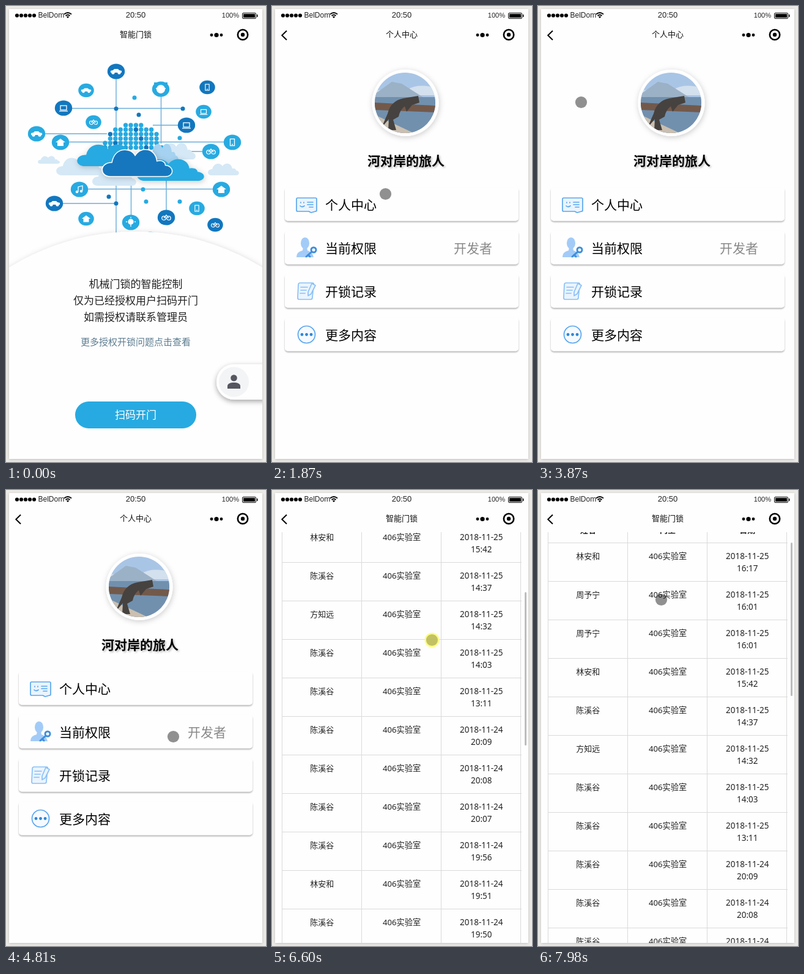
These frames come from a looping animation (425 px wide and 746 px high, 8000 ms). An HTML page:

```html
<!DOCTYPE html>
<html lang="zh-CN">
<head>
<meta charset="utf-8">
<title>智能门锁</title>
<style>
html, body { margin: 0; width: 100%; height: 100%; overflow: hidden; background: #ecebe7; }
svg { display: block; width: 425px; height: 746px; }
text { font-family: "Noto Sans", "Noto Sans CJK SC", "Noto Sans CJK", sans-serif; }
.status text { font-family: "Liberation Sans", sans-serif; fill: #222; }
.glyph { fill: none; stroke: #fff; stroke-width: 1.3; }
.glyph .solid { fill: #fff; stroke: none; }
.icon { fill: #eaf4fe; stroke: #5aa6ec; stroke-width: 1.7; stroke-linecap: round; stroke-linejoin: round; }
.icon .line { fill: none; }
</style>
</head>
<body>
<script>
const LOOP = 8000, WIDTH = 414;
const SKY = '#27aae1', DEEP = '#1277bf', PALE = '#d5e8f6', PAPER = '#fefefe';

// ---------- drawing helpers ----------
const repeat = (count, draw) => Array.from({ length: count }, (_, i) => draw(i)).join('');
const text = (str, x, cy, size, { fill = '#222', anchor = 'middle', extra = '' } = {}) =>
  `<text x="${x}" y="${cy + size * 0.37}" font-size="${size}" fill="${fill}" text-anchor="${anchor}" ${extra}>${str}</text>`;
const label = (str, x, cy, fill = '#000') => text(str, x, cy, 21, { fill, anchor: 'start' });
const circle = (x, y, r, fill, extra = '') => `<circle cx="${x}" cy="${y}" r="${r}" fill="${fill}" ${extra}/>`;
const rect = (x, y, w, h, fill, extra = '') =>
  `<rect x="${x}" y="${y}" width="${w}" height="${h}" fill="${fill}" ${extra}/>`;
const path = (d, attrs = '') => `<path d="${d}" ${attrs}/>`;
const pill = (x, y, w, h, str, size) =>
  rect(x, y, w, h, SKY, `rx="${h / 2}"`) + text(str, x + w / 2, y + h / 2, size, { fill: '#fff' });
const card = cy => rect(21, cy - 29, 382, 55, PAPER, 'rx="5" filter="url(#cardShadow)"');
const page = (id, content) => `<g id="${id}">${rect(5, 69, WIDTH, 672, PAPER)}${content}</g>`;

// ---------- home ----------
const CLOUD = 'M12 40C-4 40-4 20 14 20C18-2 40-2 47 10C56-4 76 0 78 18C86 16 90 20 90 24C103 25 103 40 90 40Z';
const cloud = (x, y, w, h, fill, edge = 'none') =>
  path(CLOUD, `transform="translate(${x} ${y}) scale(${w / 100} ${h / 40})" fill="${fill}" stroke="${edge}" stroke-width="1.5" vector-effect="non-scaling-stroke"`);

const glyphs = {
  vehicle: path('M-9 2V-1L-5-2L-3-4H3L5-2L9-1V2Z', 'class="solid"') + circle(-5, 2, 2, '#fff') + circle(5, 2, 2, '#fff'),
  screen: rect(-5, -4, 10, 7, 'none') + path('M-7 5H7'),
  handset: rect(-3.5, -5.5, 7, 11, 'none') + path('M-1 3.500H1'),
  pair: circle(-4, 1, 3.2, 'none') + circle(4, 1, 3.2, 'none') + path('M-4 1L0-4L4 1'),
  note: path('M-2 4V-4L5-6V2') + circle(-4, 4, 1.6, '#fff') + circle(3, 3, 1.6, '#fff'),
  house: path('M-8 0L0-6L8 0H5V6H-5V0Z', 'class="solid"'),
  bulb: circle(0, -1, 4, '#fff') + path('M0 3V7M-8-1H-6M6-1H8M0-9V-7')
};
const node = (glyph, color, x, y, scale = 1) =>
  `<g class="glyph" transform="translate(${x} ${y}) scale(${scale})"><ellipse rx="14.2" ry="12.6" fill="${color}" stroke="none"/>${glyphs[glyph]}</g>`;
const LOOSE = 0.9; // nodes without a connecting line are smaller

const dot = (color, ...points) => points.map(([x, y]) => circle(x, y, 3.5, color)).join('');
const globe = repeat(6, row => repeat(12, col => {
  const x = 162 + col * 8.4, y = 195 + row * 7.3;
  const inside = ((x - 207) / 48) ** 2 + ((y - 232) / 40) ** 2 < 1;
  return inside ? circle(x, y, 3.7, (col * 5 + row * 3) % 11 ? SKY : DEEP) : '';
}));

const home = page('home', `
  ${path('M180 108V372M94 167.500H289M50 209H165M89 222.500H370M253.500 136V225M240 195H295M300 238H335M120 299.500H352M204.500 285V354M262 280V346M79 323H180',
    'fill="none" stroke="#69add9" stroke-width="1.4"')}
  ${globe}
  ${dot(SKY, [210, 150], [284, 216], [224, 300], [229, 320], [284, 320])}
  ${dot(DEEP, [217, 178], [180, 168], [289, 168], [168, 312], [180, 323])}
  ${node('vehicle', DEEP, 180, 107)}
  ${node('vehicle', DEEP, 79, 323)}
  ${node('vehicle', SKY, 131, 138, LOOSE)}
  ${node('vehicle', SKY, 50, 209)}
  ${node('screen', DEEP, 94, 167)}
  ${node('screen', DEEP, 295, 195)}
  ${node('screen', SKY, 323, 173, LOOSE)}
  ${node('handset', SKY, 370, 223)}
  ${node('handset', SKY, 312, 331, LOOSE)}
  ${node('handset', DEEP, 329, 133, LOOSE)}
  ${node('pair', SKY, 143, 190, LOOSE)}
  ${node('pair', SKY, 335, 238)}
  ${node('pair', DEEP, 262, 346)}
  ${node('pair', DEEP, 342, 358, LOOSE)}
  ${node('note', SKY, 120, 300)}
  ${node('house', SKY, 352, 300)}
  ${node('house', SKY, 131, 348, LOOSE)}
  ${node('bulb', SKY, 204, 354)}
  ${node('house', SKY, 89, 223)}
  ${node('bulb', SKY, 235, 382)}
  ${node('bulb', SKY, 253, 136)}${circle(253, 136, 7, '#fff')}${rect(242, 125, 22, 4, SKY)}
  ${cloud(52, 245, 36, 13, PALE)}${cloud(330, 257, 51, 20, PALE)}
  ${cloud(82, 247, 78, 30, PALE)}${cloud(141, 264, 72, 30, PALE)}
  ${cloud(250, 223, 60, 28, PALE)}${cloud(232, 224, 50, 34, '#a5d2f0')}
  <g filter="url(#soft)">
    ${cloud(116, 225, 108, 37, SKY)}${cloud(214, 249, 110, 37, SKY)}${cloud(157, 233, 115, 46, DEEP, '#fff')}
  </g>
  ${circle(212, 762, 393, PAPER, 'filter="url(#soft)"')}
  ${['机械门锁的智能控制', '仅为已经授权用户扫码开门', '如需授权请联系管理员'].map((line, i) => text(line, 212, 455 + 27 * i, 17)).join('')}
  ${text('更多授权开锁问题点击查看', 212, 549, 15, { fill: '#5b7c90' })}
  ${path('M425 586H373a29 29 0 0 0 0 58H425Z', `fill="${PAPER}" filter="url(#tabShadow)"`)}
  ${circle(372.5, 615, 24.5, '#f3f4f6')}${circle(372.5, 608.5, 5.3, '#55565f')}
  ${path('M362 626V622C362 617 368 616 372.500 616S383 617 383 622V626Z', 'fill="#55565f"')}
  ${pill(113, 647, 198, 44, '扫码开门', 17)}`);

// ---------- profile ----------
const photo = `<g clip-path="url(#avatar)">
  ${rect(168, 108, 100, 100, '#a9c5e6')}
  ${path('M222 136Q240 126 268 134V146H168V138Z', 'fill="#d3e0ee"')}
  ${path('M168 144L196 124L212 127L248 150H168Z', 'fill="#9bb1c6"')}
  ${rect(168, 149, 100, 60, '#7190ae')}
  ${path('M168 158L268 163V174L168 170Z', 'fill="#73594a"')}
  ${path('M168 178L232 208H168Z', 'fill="#cabfb0"')}
  ${path('M190 203L191 185L179 199L189 176Q194 155 215 151L239 147L241 158L229 162L220 173L217 164Q209 170 207 181L198 186L203 203Z', 'fill="#46423f"')}
</g>`;
const menuIcons = `<g class="icon">
  ${path('M42 314H71Q73 314 73 316V334Q73 336 71 336L64 338L60 336H42Q40 336 40 334V316Q40 314 42 314Z')}
  ${path('M47 321v1M52 321v1M46 327q3 3 7 0M58 321h9M58 325h9M61 329h6', 'class="line"')}
  <g fill="#a3cbf8" stroke="none"><ellipse cx="54" cy="388" rx="7" ry="9.500"/>${path('M40 411Q40 402 50 400L51 394H57L58 400Q66 402 68 411Z')}</g>
  <g stroke="#3f8fdc" stroke-width="3">${circle(68, 399, 4, '#fff')}${path('M65 402L56 410M59 407l3 3', 'class="line"')}</g>
  <g stroke="#8bc0f5">${path('M46 453H66Q69 453 68 456L66 477Q66 480 63 480H44Q42 480 42 477L43 456Q43 453 46 453Z')}
  ${path('M47 460H58M47 465H56M46 470H54', 'class="line"')}${path('M65 454L71 457L64 471L59 474V468Z')}</g>
  ${circle(56.5, 537.5, 14, '#f5faff')}${repeat(3, i => circle(49 + 7.5 * i, 537.5, 2.4, '#2f86d6', 'stroke="none"'))}
</g>`;
const menu = ['个人中心', '当前权限', '开锁记录', '更多内容'];
const profile = page('profile', `
  ${circle(218, 158.5, 54.5, '#fff', 'filter="url(#soft)"')}${photo}
  ${text('河对岸的旅人', 219, 253, 21, { fill: '#000', extra: 'font-weight="700" filter="url(#textShadow)"' })}
  ${menu.map((item, i) => card(325.5 + 71 * i) + label(item, 87, 325.5 + 71 * i)).join('')}
  ${label('开发者', 297, 396.5, '#888')}
  ${menuIcons}`);

// ---------- personal details ----------
const details = { '真是姓名:': '林安和', '所在班级:': '应教151', '本人学号:': '20150123456' };
const info = page('info', Object.entries(details).map(([key, value], i) => {
  const y = 123.5 + 71 * i;
  return card(y) + label(key, 37, y) + label(value, 147, y);
}).join('') + pill(80, 352, 264, 55, '个人信息设置后不可更改', 19));

// ---------- unlock records ----------
const people = { a: '林安和', b: '周予宁', c: '陈溪谷', d: '方知远' };
const visitors = 'abbacdccccccacccac';
const times = '16:17 16:01 16:01 15:42 14:37 14:32 14:03 13:11 20:09 20:08 20:07 19:56 19:51 19:50 19:42 19:37 19:20 18:55'.split(' ');
const TOP = 80.5, HEAD = 43, ROW = 63, COLUMN = 130.33;
const center = column => 16.5 + COLUMN * (column + 0.5);
const rowTop = i => TOP + HEAD + ROW * i;
const grid = `M16 ${TOP}H408` + repeat(times.length, i => `M16 ${rowTop(i)}H408`) +
  repeat(4, i => `M${Math.floor(16 + COLUMN * i) + 0.5} ${TOP}V${rowTop(times.length)}`);
const records = page('records', `<g clip-path="url(#body)"><g id="rows">
  ${path(grid, 'stroke="#dadada" fill="none"')}
  ${['姓名', '门室', '日期'].map((head, i) => text(head, center(i), 102, 13, { extra: 'font-weight="700"' })).join('')}
  ${times.map((time, i) => {
    const y = rowTop(i) + 21.5;
    return text(people[visitors[i]], center(0), y, 13) + text('406实验室', center(1), y, 13.2) +
      text(`2018-11-${i < 8 ? 25 : 24}`, center(2), y, 13.5) + text(time, center(2), y + 20, 13.5);
  }).join('')}
</g></g>${rect(413, 72, 3, 251, '#bdbdbd', 'id="scrollbar" rx="1.5"')}`);

// ---------- phone frame ----------
const bars = `${rect(5, 5, WIDTH, 64, PAPER)}
<g class="status">
  ${repeat(5, i => circle(18 + 7 * i, 15.5, 3.1, '#000'))}
  ${text('BelDom', 52.5, 14.5, 12, { anchor: 'start' })}
  ${text('20:50', 212, 14.5, 13)}
  ${text('100%', 381, 15, 11, { anchor: 'end' })}
</g>
${path('M95 13.500Q101 8.500 107 13.500M97.500 16Q101 13 104.500 16', 'fill="none" stroke="#000" stroke-width="1.7"')}
${path('M98.800 17.500Q101 15.800 103.200 17.500L101 20Z')}
${rect(386.5, 11.5, 22, 9, 'none', 'stroke="#000" rx="1.5"')}${rect(388, 13, 19, 6, '#000')}${rect(410, 14, 1.5, 4, '#000')}
${path('M24 40.500L16.300 48L24 55.500', 'id="back" fill="none" stroke="#000" stroke-width="2"')}
<text id="title" x="212" y="51" font-size="13" text-anchor="middle" fill="#111"></text>
${circle(336, 47.5, 2.4, '#000')}${circle(344, 47.5, 3.6, '#000')}${circle(352, 47.5, 2.4, '#000')}
${circle(387, 47, 8.2, 'none', 'stroke="#000" stroke-width="2.6"')}${circle(387, 47, 3.2, '#000')}`;

const shadow = (id, dx, dy, blur, opacity) =>
  `<filter id="${id}" x="-20%" y="-30%" width="140%" height="160%"><feDropShadow dx="${dx}" dy="${dy}" stdDeviation="${blur}" flood-opacity="${opacity}"/></filter>`;

document.body.innerHTML = `<svg viewBox="0 0 425 746">
<defs>
  ${shadow('cardShadow', 0, 2, 1.3, 0.3)}${shadow('soft', 1, 2, 5, 0.2)}${shadow('tabShadow', 0, 3, 4, 0.35)}
  ${shadow('textShadow', 2, 2, 1.5, 0.25)}${shadow('frameShadow', 0, 1, 2, 0.2)}
  <clipPath id="screen">${rect(5, 5, WIDTH, 736, '#000')}</clipPath>
  <clipPath id="body">${rect(5, 69, WIDTH, 672, '#000')}</clipPath>
  <clipPath id="avatar">${circle(217.5, 158.5, 49.5, '#000')}</clipPath>
</defs>
${rect(5, 5, WIDTH, 736, PAPER, 'filter="url(#frameShadow)"')}
<g clip-path="url(#screen)">${home}${profile}${info}${records}${bars}</g>
<g id="cursor">${circle(0.5, 0.5, 12, '#ffff6e', 'id="press" fill-opacity="0.85"')}${circle(0.5, 0.5, 9.6, '#000', 'id="dot"')}</g>
</svg>`;

// ---------- timeline ----------
const clamp = v => Math.min(1, Math.max(0, v));
const progress = (t, start, length) => clamp((t - start) / length);
const smooth = u => u * u * (3 - 2 * u);

const OPEN_PROFILE = 1080, OPEN_INFO = 2480, CLOSE_INFO = 3620, OPEN_RECORDS = 5510;
const SLIDE = 240, CLICK = 80, APPEAR = 460;
const slide = (t, start) => 1 - (1 - progress(t, start, SLIDE)) ** 2;

const clicks = [920, 2330, 3400, 5270];
const swipes = [
  { start: 5900, length: 350, distance: 350 },
  { start: 6430, length: 505, distance: -350 },
  { start: 7130, length: 270, distance: 126 },
  { start: 7530, length: 300, distance: -89 }
];

// Each move eases the cursor from wherever it was to x, y.
const moves = [];
const go = (start, end, x, y) => moves.push({ start, end, x, y });
go(0, 0, 412, 714);
go(APPEAR, 760, 371, 631);    // profile button
go(1400, 1870, 185, 307);     // first menu item
go(2990, 3100, 146, 171);
go(3100, 3350, 13, 46);       // back arrow
go(3560, 4500, 235, 478);
go(4680, 4810, 273, 403);     // permission
go(4900, 5110, 249, 470);     // unlock records
go(5900, 6250, 260, 152);
go(6430, 6935, 264, 502);
go(6935, 7060, 269, 216);
go(7130, 7400, 255, 90);
go(7400, 7530, 245, 237);
go(7530, 7830, 238, 326);
go(7830, 7980, 201, 179);

function cursorAt(t) {
  let x = 0, y = 0;
  for (const m of moves) {
    if (t < m.start) break;
    const u = smooth(progress(t, m.start, m.end - m.start || 1));
    x += (m.x - x) * u;
    y += (m.y - y) * u;
  }
  return t ? [x, y] : [moves[0].x, moves[0].y];
}
const scrollAt = t => swipes.reduce((sum, s) => sum + s.distance * smooth(progress(t, s.start, s.length)), 0);
const within = (t, start, length) => t >= start && t < start + length;
const pressedAt = t => clicks.some(start => within(t, start, CLICK)) ||
  swipes.some(s => within(t, s.start, s.length));

const $ = id => document.getElementById(id);
const place = (id, x, y = 0) => $(id).setAttribute('transform', `translate(${Math.round(x)} ${Math.round(y)})`);
const show = (id, visible) => $(id).setAttribute('display', visible ? 'inline' : 'none');

function render(t) {
  place('profile', WIDTH * (1 - slide(t, OPEN_PROFILE)));
  place('info', WIDTH * (1 - slide(t, OPEN_INFO) + slide(t, CLOSE_INFO)));
  place('records', WIDTH * (1 - slide(t, OPEN_RECORDS)));

  const onProfile = (t >= OPEN_PROFILE && t < OPEN_INFO) || (t >= CLOSE_INFO && t < OPEN_RECORDS);
  $('title').textContent = onProfile ? '个人中心' : '智能门锁';
  show('back', t >= OPEN_PROFILE);

  const scroll = scrollAt(t);
  place('rows', 0, -scroll);
  place('scrollbar', 0, scroll * 0.37);

  const pressed = pressedAt(t);
  place('cursor', ...cursorAt(t));
  show('cursor', t >= APPEAR);
  show('press', pressed);
  $('dot').setAttribute('fill-opacity', pressed ? 0.24 : 0.43);
}

const began = performance.now();
function frame() {
  render((performance.now() - began) % LOOP);
  requestAnimationFrame(frame);
}
frame();
</script>
</body>
</html>
```
